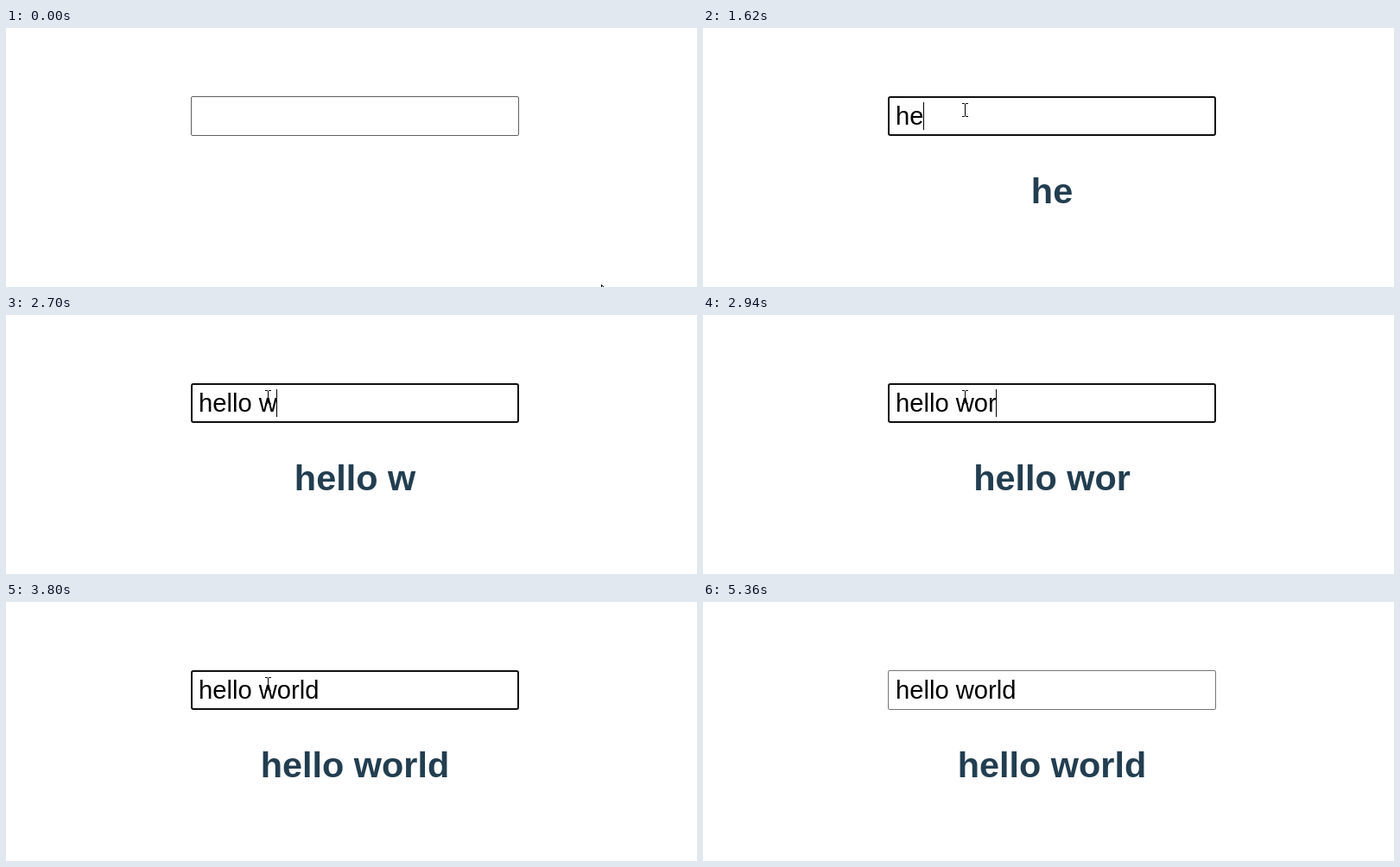
These frames come from a looping animation (800x300 px, 5430 ms). An HTML page with a canvas:

```html
<!DOCTYPE html>
<html lang="en">
<head>
<meta charset="utf-8">
<title>Live text input</title>
<style>
html, body { margin: 0; width: 100%; height: 100%; overflow: hidden; background: #fff; }
canvas { display: block; }
</style>
</head>
<body>
<canvas id="stage" width="800" height="300"></canvas>
<script>
const ctx = document.getElementById('stage').getContext('2d', { alpha: false });
const LOOP = 5430;
const MESSAGE = 'hello world';
const KEY_TIMES = [1390, 1620, 1850, 2000, 2230, 2380, 2700, 2870, 2940, 3110, 3340];
const CARET_SPANS = [[610, 1160], [1390, 3800], [4350, 4890]];
const FOCUS = [610, 5360];
const CLICK = [610, 700];
const ENTER_TIMES = [70, 140, 210, 290, 360, 440];
const START = [689, 297];
const REST = [303, 95];
// Pointer positions while leaving: time, x, y
const LEAVE = [[4650, 429, 171], [4730, 520, 216], [4810, 600, 249], [4890, 649, 268]];
const GONE = 4960;

const within = (t, [from, to]) => t >= from && t < to;
const countPassed = (times, t) => times.filter(time => t >= time).length;

function pointerAt(t) {
  if (t >= GONE) return null;
  const left = LEAVE.filter(([time]) => t >= time).pop();
  if (left) return left.slice(1);
  const u = countPassed(ENTER_TIMES, t) / ENTER_TIMES.length;
  const eased = u * u * (3 - 2 * u);
  return START.map((v, i) => Math.round(v + (REST[i] - v) * eased));
}

function drawField(t) {
  const focused = within(t, FOCUS);
  const inset = focused ? 1 : 0.5;
  ctx.strokeStyle = focused ? '#101010' : t < 70 ? '#606060' : '#767676';
  ctx.lineWidth = inset * 2;
  ctx.beginPath();
  ctx.roundRect(214 + inset, 79 + inset, 380 - inset * 2, 46 - inset * 2, focused ? 2 : 1.5);
  ctx.stroke();
}

function drawText(t) {
  const typed = MESSAGE.slice(0, countPassed(KEY_TIMES, t));
  ctx.fillStyle = '#000';
  ctx.textAlign = 'left';
  ctx.font = '29.2px "Liberation Sans", Arial, sans-serif';
  ctx.fillText(typed, 223, 112);
  if (CARET_SPANS.some(span => within(t, span))) {
    ctx.fillRect(Math.floor(223 + ctx.measureText(typed).width), 86, 1, 32);
  }
  ctx.fillStyle = '#223e50';
  ctx.textAlign = 'center';
  ctx.font = 'bold 41.4px "Liberation Sans", Arial, sans-serif';
  ctx.fillText(typed.trimEnd(), 404, 203);
}

function drawIBeam(x, y) {
  ctx.fillStyle = '#000';
  ctx.fillRect(x, y - 7, 1, 14);
  for (const row of [y - 8, y + 7]) {
    ctx.fillRect(x - 3, row, 3, 1);
    ctx.fillRect(x + 1, row, 3, 1);
  }
}

function drawArrow(x, y) {
  const outline = [[0, 0], [0, 16], [4, 12.5], [6.5, 18], [9, 17], [6.5, 11.5], [11, 11]];
  ctx.beginPath();
  for (const [dx, dy] of outline) ctx.lineTo(x + dx + 0.5, y + dy + 0.5);
  ctx.closePath();
  ctx.fillStyle = '#fff';
  ctx.fill();
  ctx.strokeStyle = '#000';
  ctx.lineWidth = 1;
  ctx.stroke();
}

function drawPointer(t) {
  if (within(t, CLICK)) {
    ctx.fillStyle = 'rgba(255, 255, 0, 0.5)';
    ctx.beginPath();
    ctx.arc(301, 94.5, 15, 0, Math.PI * 2);
    ctx.fill();
  }
  const pointer = pointerAt(t);
  if (!pointer) return;
  const [x, y] = pointer;
  const overField = x > 214 && x < 594 && y > 79 && y < 125;
  const overHeading = t > KEY_TIMES[10] && x > 297 && x < 512 && y > 165 && y < 213;
  (overField || overHeading ? drawIBeam : drawArrow)(x, y);
}

function render(now) {
  const t = now % LOOP;
  ctx.fillStyle = '#fff';
  ctx.fillRect(0, 0, 800, 300);
  drawField(t);
  drawText(t);
  drawPointer(t);
}

const begin = performance.now();
function tick() {
  render(performance.now() - begin);
  requestAnimationFrame(tick);
}
tick();
</script>
</body>
</html>
```
